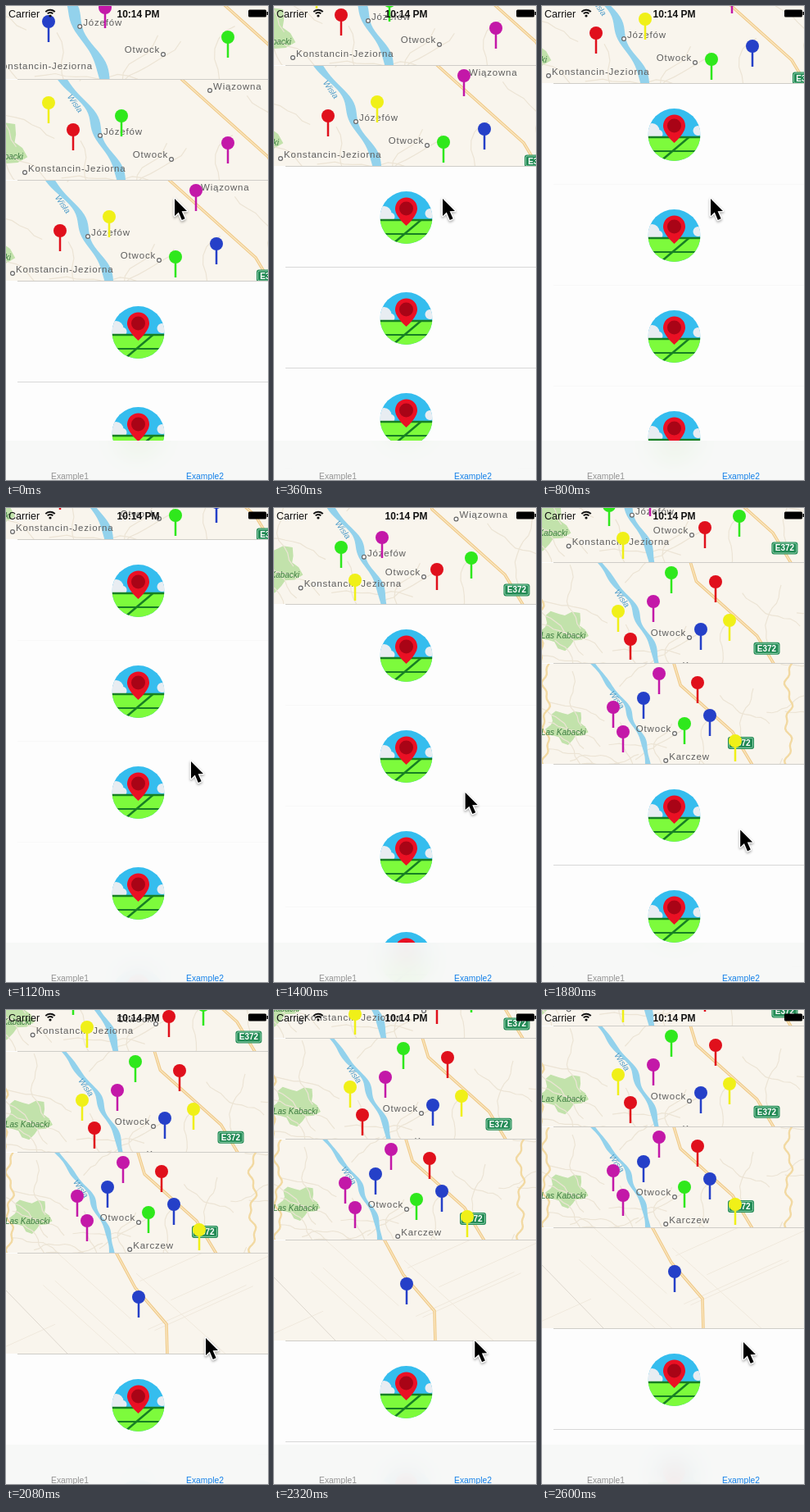
An HTML page with a canvas for the animation above (2640 ms loop, 320 by 578 pixels).

```html
<!DOCTYPE html>
<html lang="en">
<head>
<meta charset="utf-8">
<title>Map list</title>
<style>
html, body { margin: 0; width: 100%; height: 100%; overflow: hidden; background: #fdfdfd; }
canvas { display: block; width: 320px; height: 578px; }
</style>
</head>
<body>
<canvas id="stage" width="320" height="578"></canvas>
<script>
const canvas = document.getElementById('stage');
const ctx = canvas.getContext('2d');
const W = 320, H = 578, ROW = 123, LOOP = 2640, BAR = 530, FIRST_TOP = -33, ROW_COUNT = 9;
const SANS = '"Liberation Sans", Arial, sans-serif';
const PIN = { r: '#e0101c', g: '#2fe81c', b: '#2540c8', m: '#c318a8', y: '#f0f018' };

// [time in ms, values...]
const SCROLL = [[0, 0], [360, 140], [800, 241], [1680, 374], [2600, 439]];
const CURSOR = [[0, 206, 235], [880, 206, 235], [1120, 226, 309], [2080, 244, 400], [2600, 246, 405]];

// zoom and (ox, oy) place the town map, whose origin is Otwock
const ROWS = [
  { zoom: 1.17, ox: 192, oy: 92, pins: 'b52,52 m121,35 g271,71' },
  { zoom: 1, ox: 202, oy: 97, pins: 'y52,28 g141,44 r82,61 m271,77' },
  { zoom: 1, ox: 187, oy: 97, pins: 'm232,12 y126,44 r66,61 b257,77 g207,93' },
  { zoom: .84, ox: 183, oy: 89, pins: 'm132,41 g82,53 g241,66 r199,80 y99,93' },
  { zoom: .7, ox: 180, oy: 91, pins: 'g158,12 r212,23 m136,47 y93,59 y229,70 b194,81 r108,93' },
  { zoom: .6, ox: 162, oy: 85, pins: 'm143,12 r190,23 b124,42 m87,53 b205,63 g174,73 m99,83 y236,94' },
  { fields: true, pins: 'b162,53' }
];
const loadTime = i => i < 3 ? 0 : i === 3 ? 1400 : i < ROWS.length ? 1280 + i * 120 : Infinity;

const range = (from, to, step, fn) =>
  Array.from({ length: Math.floor((to - from) / step) + 1 }, (_, i) => fn(from + i * step));

function seeded(seed) {
  return () => (seed = (seed * 16807) % 2147483647) / 2147483647;
}

// Monotone cubic through the key points
function curveAt(keys, t, k = 1) {
  const last = keys.length - 1;
  const slope = i => (keys[i + 1][k] - keys[i][k]) / (keys[i + 1][0] - keys[i][0]);
  const tangent = i => {
    if (i === 0) return 2 * slope(0) - tangent(1);
    if (i === last) return 2 * slope(last - 1) - tangent(last - 1);
    const a = slope(i - 1), b = slope(i);
    return a * b > 0 ? 2 * a * b / (a + b) : 0;
  };
  let i = 0;
  while (i < last - 1 && t >= keys[i + 1][0]) i++;
  const d = keys[i + 1][0] - keys[i][0], u = Math.min(1, (t - keys[i][0]) / d), w = 1 - u;
  return keys[i][k] * w * w * (1 + 2 * u) + keys[i + 1][k] * u * u * (1 + 2 * w)
    + d * u * w * (tangent(i) * w - tangent(i + 1) * u);
}

function trace(points) {
  ctx.beginPath();
  points.forEach(([x, y]) => ctx.lineTo(x, y));
}

function stroke(color, width) {
  ctx.strokeStyle = color;
  ctx.lineWidth = width;
  ctx.stroke();
}

function fill(color) {
  ctx.fillStyle = color;
  ctx.fill();
}

function line(points, color, width) {
  trace(points);
  stroke(color, width);
}

function disc(x, y, r, color) {
  ctx.beginPath();
  ctx.arc(x, y, r, 0, Math.PI * 2);
  fill(color);
}

function box(x, y, w, h, r) {
  ctx.beginPath();
  ctx.roundRect(x, y, w, h, r);
}

function text(str, x, y, font, color, align = 'left', spacing = 0) {
  ctx.font = `${font} ${SANS}`;
  ctx.letterSpacing = spacing + 'px';
  ctx.textAlign = align;
  ctx.fillStyle = color;
  ctx.fillText(str, x, y);
  ctx.letterSpacing = '0px';
}

// name, position, side of the label, smallest zoom that shows it
const TOWNS = [
  ['Józefów', -87, -29, 1, .8], ['Otwock', 0, 0, -1, 0], ['Konstancin-Jeziorna', -179, 16, 1, .8],
  ['Wiązowna', 47, -84, 1, .8], ['Karczew', -18, 55, 1, 0]
];
const HIGHWAY = [[-10, -170], [12, -98], [118, -3], [165, 75]];

const riverX = y => -72 + .42 * y - .0018 * y * y + 3 * Math.sin(y / 13);
const riverBank = side => range(-160, 100, 4, y => [riverX(y) + side * (5 + 2 * Math.sin(y / 9 + side)), y]);
const RIVER = [...riverBank(-1), ...riverBank(1).reverse()];

const FOREST = range(0, 6.1, .3, a => {
  const r = 1 + .22 * Math.sin(a * 5);
  return [-220 + 38 * r * Math.cos(a), -14 + 31 * r * Math.sin(a)];
});

const winding = x => range(-150, 80, 5, y => [x + 6 * Math.sin(y / 13) + 3 * Math.sin(y / 5), y]);
const SIDE_ROADS = [winding(232), winding(-262)];

// A road that wanders from a random start
function lane(random) {
  let x = -290 + random() * 520, y = -140 + random() * 200, angle = random() * 7;
  return range(0, 11, 1, () => {
    angle += random() - .5;
    return [x += 11 * Math.cos(angle), y += 11 * Math.sin(angle)];
  });
}
const laneRandom = seeded(41);
const LANES = range(1, 22, 1, () => lane(laneRandom));

function drawHighway(points) {
  line(points, '#f0cb8c', 3.6);
  line(points, '#fbe9c4', 1.2);
}

function drawBadge(x, y) {
  box(x - 16, y - 7.5, 32, 15, 3);
  fill('#238a55');
  box(x - 14.5, y - 6, 29, 12, 2);
  stroke('#8fd0ac', 1);
  text('E372', x, y + 3.5, 'bold 10px', '#fff', 'center');
}

function drawTown(name, x, y, side) {
  ctx.beginPath();
  ctx.arc(x, y, 2.4, 0, Math.PI * 2);
  fill('#fff');
  stroke('#666', 1.2);
  text(name, x + 4 * side, y - (side > 0 ? 1 : 2), '11.5px', '#5e5e5e', side > 0 ? 'left' : 'right', .8);
}

function drawTownMap({ zoom, ox, oy }) {
  const place = ([x, y]) => [ox + x * zoom, oy + y * zoom];
  const placed = points => points.map(place);
  trace(placed(FOREST));
  fill('#c2e2ab');
  LANES.forEach(points => line(placed(points), '#ece4d5', 1.2));
  SIDE_ROADS.forEach(points => line(placed(points), '#f2d9a2', 2.4));
  trace(placed(RIVER));
  fill('#93d2ec');
  drawHighway(placed(HIGHWAY));

  ctx.save();
  ctx.translate(...place([-118, -68]));
  ctx.rotate(.95);
  text('Wisła', 0, 3, 'italic 10px', '#4b9ac8', 'center');
  ctx.restore();

  const [fx, fy] = place([-181, -4]);
  text('Las Kabacki', fx, fy + 4, 'italic 10px', '#3d7d40', 'right');
  TOWNS.forEach(([name, x, y, side, minZoom]) => {
    if (zoom >= minZoom) drawTown(name, ...place([x, y]), side);
  });
  drawBadge(...place([135, 19]));
}

function drawFields() {
  const random = seeded(7);
  for (let i = 0; i < 9; i++) {
    const x = random() * W, y = random() * ROW, slope = i % 2 ? .9 : -.45;
    line([[x - 60, y - 60 * slope], [x + 60, y + 60 * slope]], '#f0e9dd', 1);
  }
  line([[0, 45], [75, 122]], '#ddd7ce', 1);
  drawHighway([[133, -4], [158, 42], [196, 86], [197, 124]]);
}

function drawPin(spec) {
  const [x, y] = spec.slice(1).split(',').map(Number);
  const color = PIN[spec[0]];
  ctx.fillStyle = color;
  ctx.fillRect(x - 1.25, y, 2.5, 25);
  disc(x, y, 8, color);
}

function drawMap(row) {
  ctx.save();
  ctx.beginPath();
  ctx.rect(0, 0, W, ROW - 1);
  ctx.clip();
  ctx.fillStyle = '#f9f5ed';
  ctx.fillRect(0, 0, W, ROW);
  if (row.fields) drawFields(); else drawTownMap(row);
  row.pins.split(' ').forEach(drawPin);
  ctx.restore();
}

function drawPlaceholder() {
  const dark = '#177f24', cloud = '#e8edf2';
  ctx.save();
  ctx.translate(161.5, 62);
  ctx.beginPath();
  ctx.arc(0, 0, 32, 0, Math.PI * 2);
  ctx.clip();
  ctx.fillStyle = '#35bdee';
  ctx.fillRect(-32, -32, 64, 64);
  disc(-27, -5, 9, cloud);
  disc(-19, -1, 5, cloud);
  disc(29, -5, 6, cloud);
  ctx.fillStyle = '#7dfb3c';
  ctx.fillRect(-32, 2, 64, 30);
  line([[-32, 3], [32, 3]], dark, 2.4);
  line([[-32, 20], [32, 20]], dark, 2);
  line([[-14, 30], [18, 3]], dark, 2.4);
  ctx.beginPath();
  ctx.arc(0, -11, 13.5, Math.PI * .88, Math.PI * .12);
  ctx.quadraticCurveTo(9, 2, 0, 10);
  ctx.quadraticCurveTo(-9, 2, -12.6, -6);
  fill('#ea1024');
  disc(0, -11, 8.5, '#a90416');
  ctx.restore();
}

function drawRows(t) {
  const offset = Math.round(curveAt(SCROLL, t));
  const crisp = t < 640 || t > 1400;
  for (let i = 0; i < ROW_COUNT; i++) {
    const top = FIRST_TOP + i * ROW - offset;
    if (top > H || top + ROW < 0) continue;
    const loaded = t >= loadTime(i);
    ctx.save();
    ctx.translate(0, top);
    if (loaded) drawMap(ROWS[i]); else drawPlaceholder();
    ctx.fillStyle = loaded ? '#cfcdc8' : crisp ? '#d8d8d8' : '#f8f8f8';
    ctx.fillRect(14, ROW - 1, W - 14, 1);
    ctx.restore();
  }
}

function drawTabBar() {
  ctx.save();
  ctx.beginPath();
  ctx.rect(0, BAR, W, H - BAR);
  ctx.clip();
  ctx.filter = 'blur(12px)';
  ctx.drawImage(canvas, 0, 0);
  ctx.filter = 'none';
  ctx.fillStyle = 'rgba(247,248,247,.95)';
  ctx.fillRect(0, BAR, W, H - BAR);
  ctx.restore();
  text('Example1', 78, 577, '10.3px', '#929292', 'center');
  text('Example2', 243, 577, '10.3px', '#1480e8', 'center');
}

function drawStatusBar() {
  text('Carrier', 3, 13.5, '12.5px', '#111');
  text('10:14 PM', 161.5, 13.5, 'bold 12px', '#111', 'center');
  disc(54, 12, 1.6, '#111');
  [4.5, 7.8].forEach(r => {
    ctx.beginPath();
    ctx.arc(54, 12.5, r, -Math.PI * .76, -Math.PI * .24);
    stroke('#111', 1.9);
  });
  box(296, 4.5, 22, 9, 1.5);
  fill('#000');
  ctx.fillRect(318.5, 7, 1.5, 4);
}

function drawCursor(t) {
  ctx.save();
  ctx.translate(curveAt(CURSOR, t, 1), curveAt(CURSOR, t, 2));
  trace([[0, 0], [0, 21], [4.8, 16.6], [8.8, 26], [12.6, 24.2], [8.6, 15.2], [15, 15]]);
  ctx.closePath();
  ctx.shadowColor = 'rgba(0,0,0,.35)';
  ctx.shadowBlur = 3;
  ctx.shadowOffsetY = 1.5;
  ctx.lineJoin = 'round';
  stroke('#fff', 2.6);
  ctx.shadowColor = 'transparent';
  fill('#000');
  ctx.restore();
}

// The picture updates every 80 ms at first, then every 40 ms.
function stepTime(t) {
  if (t < 40) return 0;
  return t < 600 ? 40 + Math.floor((t - 40) / 80) * 80 : Math.floor(t / 40) * 40;
}

function draw(t) {
  ctx.fillStyle = '#fdfdfd';
  ctx.fillRect(0, 0, W, H);
  drawRows(t);
  drawTabBar();
  drawStatusBar();
  drawCursor(t);
}

let start;
function frame(now) {
  start ??= now;
  draw(stepTime((now - start) % LOOP));
  requestAnimationFrame(frame);
}
draw(0);
requestAnimationFrame(frame);
</script>
</body>
</html>
```
